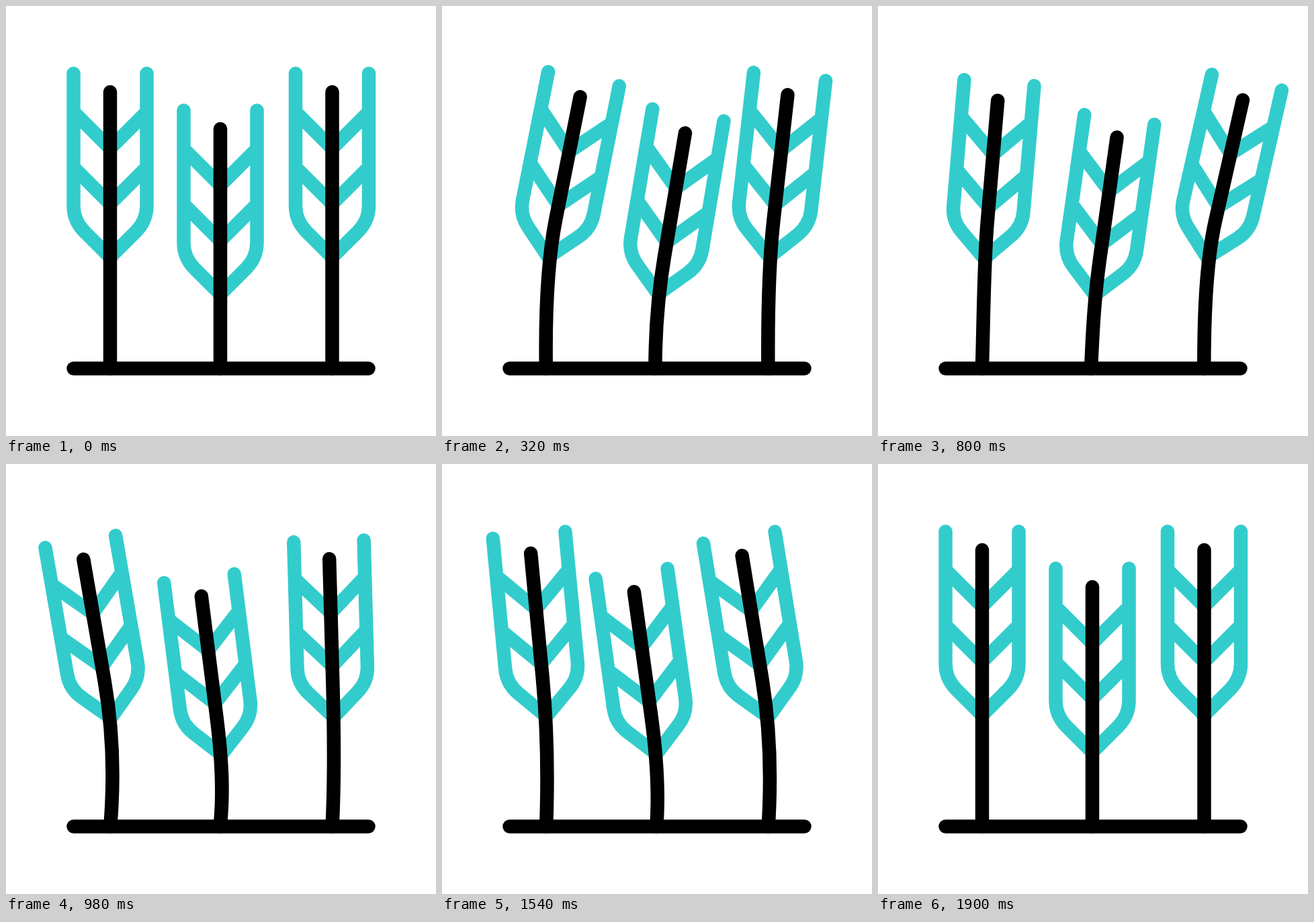
Animation, 640 px wide and 640 px high, one loop 2.4 s. Source, as an HTML page:

```html
<!DOCTYPE html>
<html lang="en">
<head>
<meta charset="utf-8">
<title>Swaying wheat</title>
<style>
  html, body { margin: 0; width: 100%; height: 100%; overflow: hidden; background: #fff; }
  svg { display: block; width: 100%; height: 100%; }
  path { fill: none; stroke-width: 20.5; stroke-linecap: round; }
  .ear { stroke: #33cccc; }
  .stem { stroke: #000; }
</style>
</head>
<body>
<svg viewBox="0 0 640 640"></svg>
<script>
const LOOP = 2400, STEP = 20, GROUND = 539.5;
const svg = document.querySelector("svg");

// Each plant leans right, then left, then returns; keys are the turning times in ms.
// lowY is the lower stem handle; lowX and rootX are [right, left] offsets.
const plants = [
  { x: 155, y: 366, keys: [0, 545, 1145, 1795], lowY: 460, lowX: [-2, 9], rootX: [-0.3, 0.3] },
  { x: 319, y: 421, keys: [30, 585, 1180, 1895], lowY: 490, lowX: [-3, 8], rootX: [-3, 0.5] },
  { x: 485.5, y: 366, keys: [95, 650, 1250, 1900], lowY: 460, lowX: [-2, 9], rootX: [-0.3, 0.3] }
];

function addPath(className, d = "") {
  const path = document.createElementNS("http://www.w3.org/2000/svg", "path");
  path.setAttribute("class", className);
  path.setAttribute("d", d);
  svg.append(path);
  return path;
}

for (const plant of plants) {
  plant.ear = addPath("ear");
  plant.stem = addPath("stem");
}
addPath("stem", `M100.5 ${GROUND}H539.5`);

// Rigid lean of the ear about its base, in plant coordinates.
function lean(degrees, dx, dy) {
  const a = degrees * Math.PI / 180, c = Math.cos(a), s = Math.sin(a);
  return ([x, y]) => [x * c - y * s + dx, x * s + y * c + dy];
}
const leanRight = lean(17.9, 7.3, 0);
const leanLeft = lean(-15.9, -1.8, 5.4);

const smooth = u => u * u * (3 - 2 * u);

// Amounts of the right and left poses at a given time.
function sway(time, [start, right, left, end]) {
  const ease = (a, b) => smooth(Math.min(1, Math.max(0, (time - a) / (b - a))));
  const turn = ease(right, left);
  return [ease(start, right) - turn, turn - ease(left, end)];
}

function drawPlant(plant, time) {
  const [r, l] = sway(time, plant.keys);
  const at = (x, y) => {
    const p = [x, y], a = leanRight(p), b = leanLeft(p);
    const mix = i => p[i] + r * (a[i] - p[i]) + l * (b[i] - p[i]);
    return `${(plant.x + mix(0)).toFixed(2)} ${(plant.y + mix(1)).toFixed(2)} `;
  };
  const shift = ([right, left]) => (plant.x + r * right + l * left).toFixed(2);
  const chevron = y => `M${at(-54.5, y - 54.5)}L${at(0, y)}L${at(54.5, y - 54.5)}`;

  plant.ear.setAttribute("d",
    `M${at(-54.5, -265.5)}L${at(-54.5, -69)}` +
    `C${at(-54.5, -54.6)}${at(-48.8, -40.8)}${at(-38.6, -30.6)}` +
    `L${at(0, 8)}L${at(38.6, -30.6)}` +
    `C${at(48.8, -40.8)}${at(54.5, -54.6)}${at(54.5, -69)}L${at(54.5, -265.5)}` +
    chevron(-154) + chevron(-71.5));

  plant.stem.setAttribute("d",
    `M${at(0, -238)}L${at(0, -50)}C${at(0, 15)}` +
    `${shift(plant.lowX)} ${plant.lowY} ${shift(plant.rootX)} ${GROUND}`);
}

function render(now) {
  const time = Math.floor(now % LOOP / STEP) * STEP;
  for (const plant of plants) drawPlant(plant, time);
}

const origin = performance.now();
function tick() {
  render(performance.now() - origin);
  requestAnimationFrame(tick);
}
tick();
</script>
</body>
</html>
```
